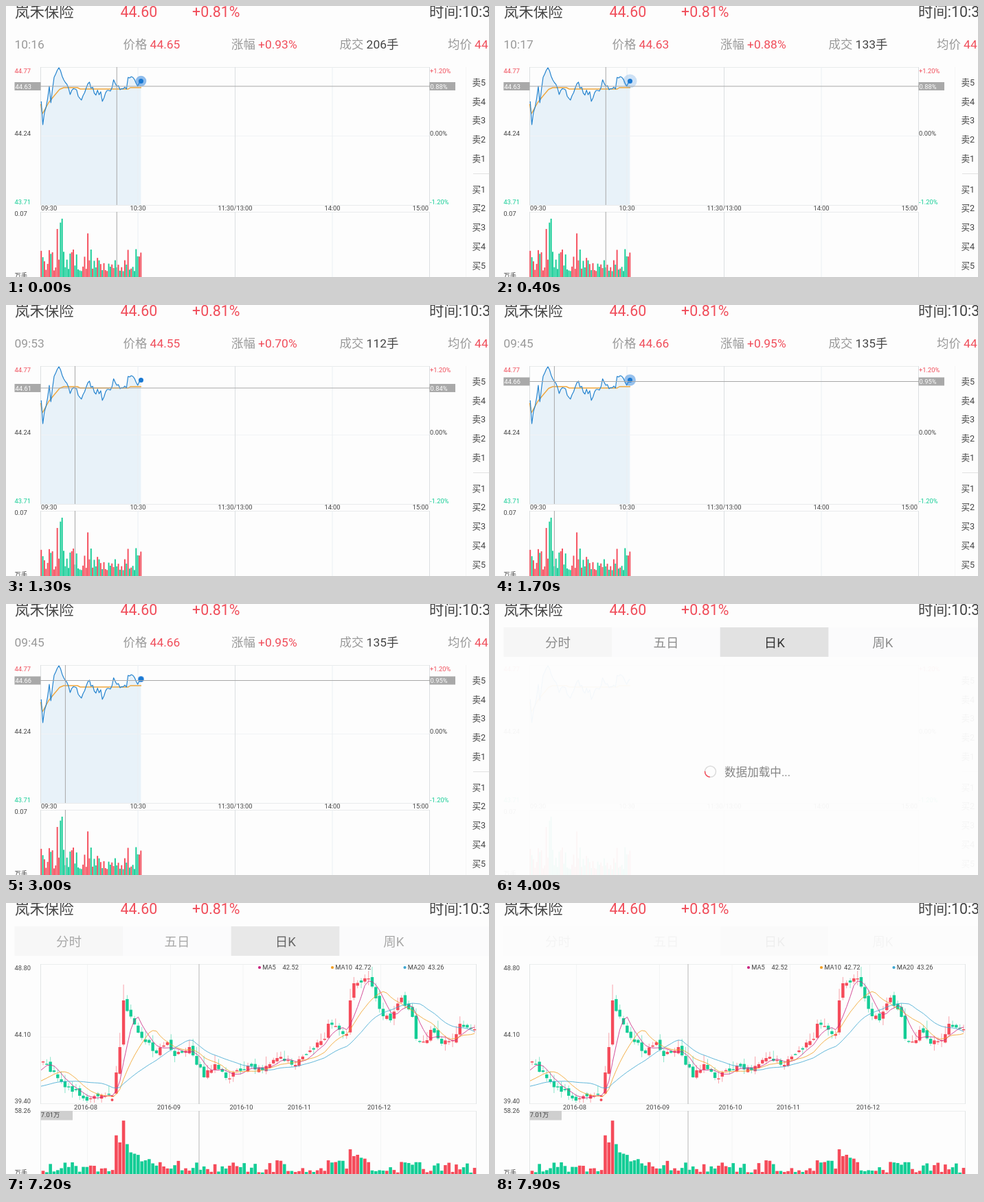
Recreate the animation shown at these times as an HTML page. Size 703 px wide and 395 px high, loop 8 s.

```html
<!DOCTYPE html>
<html lang="zh">
<head>
<meta charset="utf-8">
<title>Stock chart</title>
<style>
html, body { margin: 0; width: 100%; height: 100%; overflow: hidden; background: #fdfdfd; }
svg { display: block; width: 100vw; height: 100vh; }
text { font-family: Roboto, "Noto Sans CJK SC", "Noto Sans CJK", sans-serif; white-space: pre; }
</style>
</head>
<body>
<svg id="stage" viewBox="0 0 703 395"></svg>
<script>
const LOOP = 8000, STEP = 100;
const RED = '#f54b5a', GREEN = '#14cd96', TXT_RED = '#f04d5a', DARK = '#444', GREY = '#999';
const SMALL = 9.3;

// --- markup helpers ---
const text = (x, y, size, fill, str, anchor = 'start') =>
  `<text x="${x}" y="${y}" font-size="${size}" fill="${fill}" text-anchor="${anchor}">${str}</text>`;
const rect = (x, y, w, h, fill) =>
  `<rect x="${x}" y="${y}" width="${w}" height="${h}" fill="${fill}"/>`;
const line = (x1, y1, x2, y2, color, opacity = 1) =>
  `<path d="M${x1} ${y1}L${x2} ${y2}" stroke="${color}" opacity="${opacity}"/>`;
const dot = (x, y, r, fill) => `<circle cx="${x}" cy="${y}" r="${r}" fill="${fill}"/>`;
const path = pts => 'M' + pts.map(p => p[0].toFixed(1) + ' ' + p[1].toFixed(1)).join('L');
const curve = (pts, color, width) =>
  `<path d="${path(pts)}" fill="none" stroke="${color}" stroke-width="${width}" stroke-linejoin="round"/>`;

// --- number helpers ---
let seed = 29;
const rnd = () => (seed = seed * 16807 % 2147483647) / 2147483647;
const spread = size => (rnd() - 0.5) * 2 * size;
const lerp = (a, b, k) => a + (b - a) * Math.min(1, Math.max(0, k));

// value at x on the broken line through the key points
function along(keys, x) {
  const n = Math.max(1, keys.findIndex(k => k[0] >= x));
  const [x0, y0] = keys[n - 1], [x1, y1] = keys[n];
  return lerp(y0, y1, (x - x0) / (x1 - x0));
}

// key points stay exact, the places between them wander
function series(keys, noise) {
  const fixed = new Set(keys.map(k => k[0]));
  const count = keys[keys.length - 1][0] + 1;
  return Array.from({ length: count }, (_, i) => along(keys, i) + (fixed.has(i) ? 0 : spread(noise)));
}

// --- intraday data: line heights in px, traded lots per minute ---
const PRICE = series([[0, 139], [1, 173], [5, 117], [6, 141], [8, 104], [11, 90], [15, 111.5], [18, 129],
  [21, 121], [23, 131.5], [25, 137], [30, 111], [33, 127], [37, 125], [38, 139], [41, 123], [44, 119],
  [45, 107.5], [46, 112.6], [47, 117], [49, 122], [53, 121], [54, 104], [57, 104], [60, 117], [62, 109.5]], 4);
const PEAKS = new Map([[10, 525], [12, 590], [13, 630], [15, 135], [23, 112], [29, 480], [46, 206], [47, 133]]);
const LOTS = PRICE.map((_, i) => PEAKS.get(i) ?? Math.round(95 + 230 * rnd() ** 1.6));
const AVERAGE = [[50.5, 143], [53, 157], [62, 141], [70, 131], [78, 121.5], [84, 119],
  [104, 119], [108, 121], [178, 121], [181, 119], [197, 119]];
const minuteX = i => 51.3 + 2.34 * i;
const priceAt = i => (44.24 + (190 - PRICE[i]) * 0.0053).toFixed(2);
const gainAt = i => ((priceAt(i) - 44.24) / 44.24 * 100).toFixed(2) + '%';
const clock = i => (i < 30 ? '09:' : '10:') + String((i + 30) % 60).padStart(2, '0');

// minute under the finger by step; the info row runs one step behind
const FINGER = [[-1, 46], [0, 47], [6, 47], [7, 45], [12, 23], [13, 21], [16, 15], [80, 15]];
const minuteAt = step => Math.round(along(FINGER, step));

function header() {
  const s = 21.4, y = 16.4;
  return text(13, y, s, DARK, '岚禾保险') + text(166.5, y, s, TXT_RED, '44.60') +
    text(271, y, s, TXT_RED, '+0.81%') + text(616, y, s, DARK, '时间:10:30');
}

const leftLabels = rows => rows.map(([s, y, c = DARK]) => text(12.5, y, SMALL, c, s)).join('');

function intraday() {
  const pts = PRICE.map((y, i) => [minuteX(i), y]);
  let out = `<path d="${path(pts)}L196.4 290L50.5 290L50.5 139Z" fill="#e8f2f9"/>`;
  for (const y of [89.5, 290.5, 300.5]) out += line(50, y, 617, y, '#e9ebec');
  out += line(50, 189.5, 617, 189.5, '#f1f3f5');
  for (let i = 0; i < 5; i++) {
    const x = 50.5 + 141.5 * i, c = i % 2 ? '#eaeff3' : '#dcdfe1';
    out += line(x, 89, x, 290, c) + line(x, 300, x, 395, c);
  }
  LOTS.forEach((v, i) => {
    const fell = i > 0 && PRICE[i] > PRICE[i - 1];
    out += rect(minuteX(i) - 1, 400 - v / 7, 1.9, v / 7, fell ? GREEN : RED);
  });
  out += curve(AVERAGE, '#f0a63c', 1.4) + curve(pts, '#2584cf', 1.2);
  out += leftLabels([['44.77', 98, TXT_RED], ['44.24', 189], ['43.71', 289, GREEN], ['0.07', 306], ['万手', 395.5]]);
  out += text(617, 98, SMALL, TXT_RED, '+1.20%') + text(617, 189, SMALL, DARK, '0.00%') +
    text(617, 289, SMALL, GREEN, '-1.20%');
  out += text(51, 298, SMALL, DARK, '09:30') + text(615, 298, SMALL, DARK, '15:00', 'end');
  ['10:30', '11:30/13:00', '14:00'].forEach((s, i) => {
    out += text(192 + 141.5 * i, 298, SMALL, DARK, s, 'middle');
  });
  out += line(669.5, 89, 669.5, 395, '#f6f6f6') + line(680, 244.5, 703, 244.5, '#e2e2e2');
  for (let i = 0; i < 5; i++) {
    out += text(678.5, 115.6 + 27.9 * i, 12.6, DARK, '卖' + (5 - i)) +
      text(678.5, 271.6 + 27.8 * i, 12.6, DARK, '买' + (i + 1));
  }
  return out;
}

function pulse(t) {
  const p = (t + 300) % 1650;
  const halo = p < 1000
    ? `<circle cx="196.5" cy="109.5" r="${Math.min(10, 4.5 + p * 0.011)}" fill="#2a82dc" opacity="${0.75 * (1 - p / 1000)}"/>`
    : '';
  return halo + dot(196.5, 109.5, 3.5, '#1a78d2');
}

function infoRow(i) {
  const y = 62.4, s = 17.4;
  const pair = (x, label, value, color) =>
    text(x, y, s, GREY, `${label} <tspan fill="${color}">${value}</tspan>`);
  return text(12.5, y, s, GREY, clock(i)) + pair(170.5, '价格', priceAt(i), TXT_RED) +
    pair(328, '涨幅', '+' + gainAt(i), TXT_RED) + pair(485.5, '成交', LOTS[i] + '手', DARK) +
    pair(643, '均价', '44.62', TXT_RED);
}

function crosshair(i) {
  const x = minuteX(i), y = PRICE[i], c = '#a8a8a8';
  return line(x, 89, x, 290, c) + line(x, 300, x, 395, c) + line(50, y, 617, y, c) +
    rect(12.5, y - 6, 38, 12, '#a9a9a9') + rect(616.5, y - 6, 37.5, 12, '#a9a9a9') +
    text(13.5, y + 3.8, SMALL, '#fff', priceAt(i)) + text(617.5, y + 3.8, SMALL, '#fff', gainAt(i));
}

function tabs(active) {
  let out = rect(12.5, 34, 690.5, 43, '#fbfbfc');
  ['分时', '五日', '日K', '周K'].forEach((s, i) => {
    const x = 12.5 + 157.6 * i;
    if (i === 0) out += rect(x, 34, 157.6, 43, '#f6f6f6');
    if (i === active) out += rect(x, 34, 157.6, 43, '#e2e2e2');
    out += text(x + 79, 62.6, 18.5, i === active ? '#333' : '#8c8c8c', s, 'middle');
  });
  return out;
}

function loading(t) {
  const turn = 95 + (Math.min(t, 4400) - 4000) * 0.18;
  return '<circle cx="313.5" cy="244.3" r="8" fill="none" stroke="#dcdcdc" stroke-width="1.5"/>' +
    `<path d="M321.5 244.3A8 8 0 0 1 313.5 252.3" transform="rotate(${turn} 313.5 244.3)" fill="none" stroke="${RED}" stroke-width="1.5"/>` +
    text(334, 250.5, 16.6, '#858585', '数据加载中...');
}

// --- daily data: closing heights in px through the turning points ---
const CLOSE = series([[0, 231], [5, 261], [12, 288], [16, 280], [19, 281], [20, 247], [21, 210], [22, 142],
  [26, 189], [31, 219], [34, 203], [36, 223], [40, 210], [44, 254], [47, 235], [50, 255], [56, 237], [60, 244],
  [64, 226], [69, 236], [73, 215], [77, 198], [78, 176], [83, 191], [84, 142], [85, 117], [89, 110], [93, 165],
  [95, 171], [98, 138], [101, 166], [102, 198], [105, 200], [106, 185], [109, 205], [112, 200], [114, 176], [118, 184]], 4);
// bursts of trading: day, height, days to fade
const BURSTS = [[20, 44, 7], [22, 42, 0.7], [64, 10, 2], [78, 14, 3], [84, 32, 2.5], [98, 12, 2]];
const MA = [[5, '#c9247f'], [10, '#f29d1f'], [20, '#3ba6d1']];
const dayX = k => 54 + 5.322 * k;
const closeAt = k => k < 0 ? 228 + Math.min(47, 2.5 * k * k) : CLOSE[k];

function movingAverage(n) {
  return CLOSE.map((_, k) => {
    let sum = 0;
    for (let j = 0; j < n; j++) sum += closeAt(k - j);
    return [k ? dayX(k) : 51, sum / n];
  });
}

const volume = k => BURSTS.reduce(
  (sum, [day, height, days]) => sum + (k < day ? 0 : height * Math.exp((day - k) / days)),
  7 + 15 * rnd() ** 1.6);

function candle(close, k) {
  const x = dayX(k), open = closeAt(k - 1) + spread(4), size = Math.abs(close - open);
  const color = close > open ? GREEN : RED;
  const top = Math.min(open, close);
  const high = top - 1 - size / 4 - 11 * rnd() ** 2;
  const low = Math.min(291, top + size + 1 + 9 * rnd() ** 2);
  const v = volume(k);
  return line(x, high, x, low, color, 0.5) + rect(x - 2.2, top, 4.4, Math.max(1.4, size), color) +
    rect(x - 2.3, 400 - v, 4.6, v, color);
}

function daily() {
  let out = '';
  for (const y of [89.5, 292.5, 303.5]) out += line(50, y, 685, y, '#eceeee');
  out += line(50, 195.5, 685, 195.5, '#f5f6f6');
  for (const x of [50.5, 684.5]) out += line(x, 89, x, 293, '#e2e5e6') + line(x, 303, x, 395, '#e2e5e6');
  [116, 237, 342.5, 427, 543].forEach((x, i) => {
    out += line(x + 2.5, 90, x + 2.5, 292, '#f3f4f4') + line(x + 2.5, 304, x + 2.5, 395, '#f3f4f4') +
      text(x, 300.8, SMALL, DARK, '2016-' + String(8 + i).padStart(2, '0'), 'middle');
  });
  out += CLOSE.map(candle).join('');
  for (const [n, color] of MA) out += curve(movingAverage(n), color, 0.8);
  return out + dot(154.5, 287, 2, RED) +
    leftLabels([['48.80', 98], ['44.10', 194.5], ['39.40', 291.5], ['58.26', 306], ['万手', 395.5]]);
}

const legend = (dots, valueXs, values) => MA.map(([n, color], i) =>
  dot(dots[i], 94, 2.1, color) +
  text(dots[i] + 4.3, 97.3, SMALL, DARK, 'MA' + n) +
  text(valueXs[i], 97.3, SMALL, DARK, values[i])).join('');

const dayLegend = legend([54, 155.5, 261.5], [83, 189, 294.5], ['44.76', '44.30', '44.49']);
const dayCross = line(281, 89, 281, 293, '#b8b8b8') + line(281, 303, 281, 395, '#b8b8b8') +
  rect(50.5, 303, 46.5, 13.5, '#cfcfcf') + text(50.8, 312.3, SMALL, DARK, '7.01万') +
  legend([369, 475, 580.5], [402.5, 508, 614], ['42.52', '42.72', '43.26']);

// --- scene ---
const stage = document.getElementById('stage');
const layer = (content = '') => {
  const g = document.createElementNS('http://www.w3.org/2000/svg', 'g');
  g.innerHTML = content;
  stage.append(g);
  return g;
};
layer(header());
const minuteLayer = layer(intraday());
const dayLayer = layer(daily());
const rowLayer = layer();
const tabLayer = layer();
const liveLayer = layer();

const fade = (g, opacity) => {
  g.setAttribute('opacity', opacity);
  g.style.display = opacity > 0 ? '' : 'none';
};

function draw(t) {
  const step = t / STEP;
  const swap = lerp(0, 1, (t - 3200) / 300);

  fade(minuteLayer, t < 3800 ? 1 : t < 4900 ? lerp(0.6, 0.04, (t - 3800) / 200) : 0);
  fade(dayLayer, t >= 4900 ? 1 : 0);
  fade(rowLayer, 1 - swap);
  fade(tabLayer, t < 7200 ? swap : lerp(0.75, 0.07, (t - 7200) / 600));
  rowLayer.innerHTML = swap < 1 ? infoRow(minuteAt(step - 1)) : '';
  tabLayer.innerHTML = swap > 0 ? tabs(t < 3800 ? 0 : 2) : '';

  let live = '';
  if (t < 3800) live += pulse(t);
  if (t < 3300) live += crosshair(minuteAt(step));
  if (t >= 3900 && t < 4900) live += loading(t);
  if (t >= 4900) live += t < 7200 ? dayLegend : dayCross;
  liveLayer.innerHTML = live;
}

let shown = -1;
const begin = performance.now();
function tick() {
  const t = Math.floor((performance.now() - begin) % LOOP / STEP) * STEP;
  if (t !== shown) draw(shown = t);
  requestAnimationFrame(tick);
}
tick();
</script>
</body>
</html>
```
